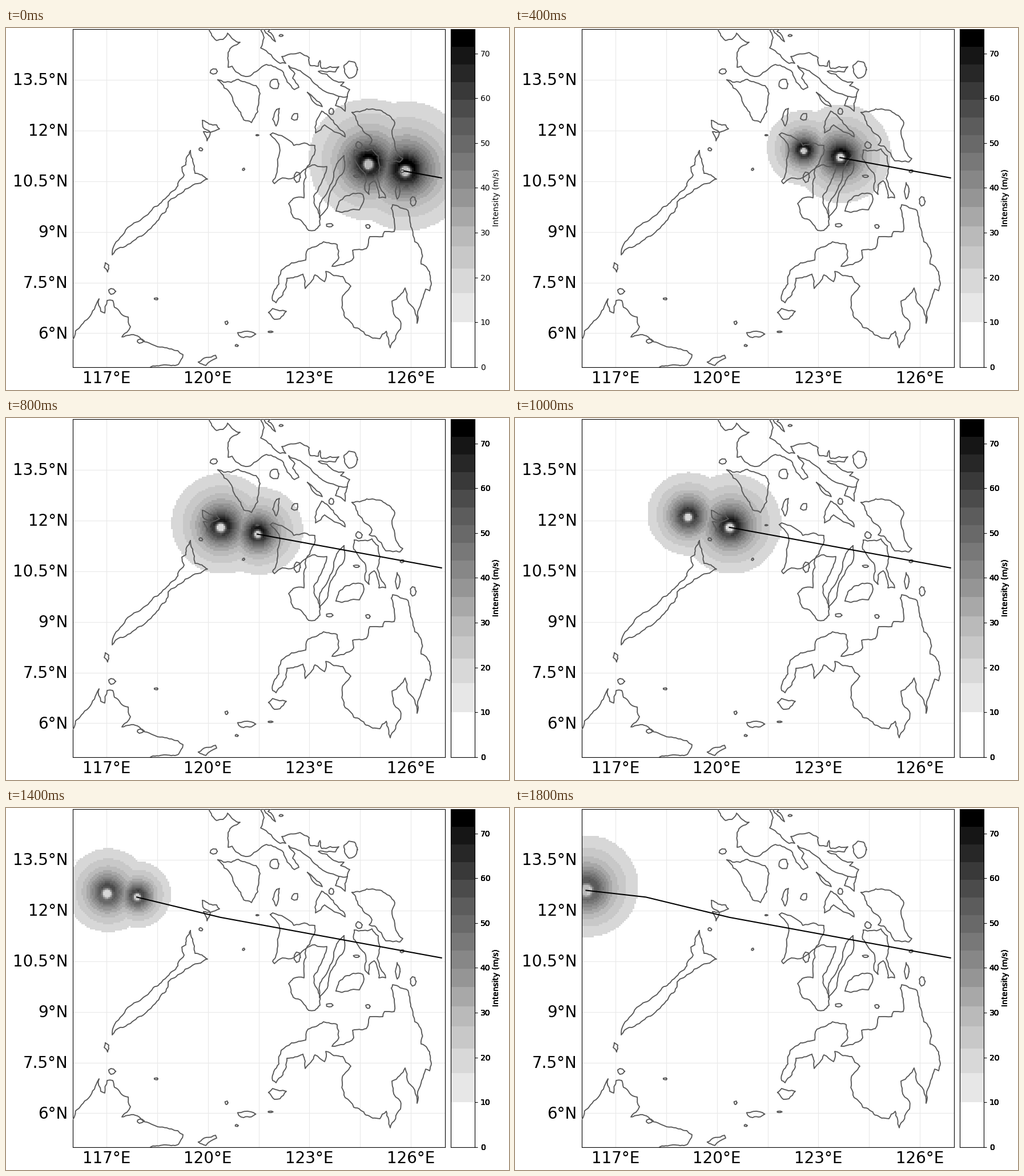
These frames come from a looping animation (881 px wide and 635 px high, 2000 ms). A matplotlib script:

```python
import numpy as np
import matplotlib.pyplot as plt
from matplotlib.animation import FuncAnimation
from matplotlib.colors import BoundaryNorm, ListedColormap

W, H = 881, 635
LEFT, RIGHT, TOP, BOTTOM = 116.5, 768.6, 2.3, 594.6
STEPS = 10
INK = "#585858"
rng = np.random.default_rng(4)

plt.rcParams["font.family"] = "DejaVu Sans"
fig = plt.figure(figsize=(W / 100, H / 100), dpi=100, facecolor="white")


def panel(x0, x1):
    return fig.add_axes([x0 / W, 1 - BOTTOM / H, (x1 - x0) / W, (BOTTOM - TOP) / H])


def px(lon, lat):
    return (LEFT + (lon - 116) * (RIGHT - LEFT) / 11,
            BOTTOM - (lat - 5) * (BOTTOM - TOP) / 10)


def label(x, y, s, **kw):
    return fig.text(x / W, 1 - y / H, s, **kw)


# Map axes use stage pixels as data units.
ax = panel(LEFT, RIGHT)
ax.set(xlim=(LEFT, RIGHT), ylim=(BOTTOM, TOP), xticks=[], yticks=[])

for lon in np.arange(117, 127, 1.5):
    x = px(lon, 5)[0]
    ax.axvline(x, color="#e9e9e9", lw=0.8, zorder=0.5)
    if lon % 3 == 0:
        label(x, 623.3, f"{lon:.0f}°E", size=20, ha="center", va="baseline")
for lat in np.arange(6, 14, 1.5):
    y = px(116, lat)[1]
    ax.axhline(y, color="#e9e9e9", lw=0.8, zorder=0.5)
    label(108.5, y - 1.7, f"{lat:g}°N", size=20, ha="right", va="center_baseline")


# ---- coastlines: key points joined by fractal lines ----
def fractal(a, b):
    """Points from a up to b, split until short, each midpoint pushed sideways."""
    d = b - a
    if np.hypot(*d) < 6:
        return [a]
    mid = (a + b) / 2 + np.array([-d[1], d[0]]) * rng.uniform(-0.12, 0.12)
    return fractal(a, mid) + fractal(mid, b)


def shore(*xy):
    keys = np.array(xy, float).reshape(-1, 2)
    points = [p for a, b in zip(keys[:-1], keys[1:]) for p in fractal(a, b)]
    ax.plot(*np.array(points + [keys[-1]]).T, color=INK, lw=1.35, zorder=3)


def land(*xy):
    shore(*xy, *xy[:2])


def islet(x, y, w, h):
    t = np.linspace(0, 2 * np.pi, 8)[:-1]
    r = rng.uniform(0.7, 1.1, 7) / 2
    land(*np.column_stack([x + w * r * np.cos(t), y + h * r * np.sin(t)]).ravel())


# Luzon
shore(356, 2, 369, 22, 380, 20, 388, 9, 398, 20, 410, 25, 389, 43, 389, 69, 396, 67,
      412, 83, 428, 84, 456, 64, 486, 78, 505, 108, 513, 104, 502, 88, 506, 80, 495, 66,
      521, 80, 536, 93, 562, 113, 583, 120, 577, 136, 594, 146, 598, 120, 583, 120)
shore(446, 2, 452, 17, 446, 35, 480, 62, 490, 62, 483, 50, 515, 43, 531, 52, 533, 66,
      547, 67, 550, 57, 553, 71, 583, 68, 577, 77, 547, 76, 574, 92, 592, 95, 586, 101,
      602, 108, 598, 120)
shore(452, 2, 460, 13, 472, 24, 459, 6, 463, 2)
# Mindoro
land(371, 91, 381, 95, 407, 90, 422, 96, 438, 101, 445, 115, 441, 147, 430, 166,
     416, 161, 402, 137, 395, 118)
# Tablas, Busuanga, Culion, Balabac
land(474, 143, 479, 141, 473, 172, 467, 160)
land(344, 162, 369, 170, 374, 177, 358, 183, 345, 174)
land(346, 182, 358, 183, 352, 198)
land(174, 412, 180, 416, 178, 428, 172, 420)
# Palawan
land(323, 215, 327, 230, 331, 255, 353, 265, 341, 272, 307, 290, 284, 305, 280, 322,
     244, 360, 218, 378, 186, 398, 190, 380, 218, 347, 244, 330, 258, 315, 297, 283,
     312, 258, 308, 244, 315, 240)
# Borneo, Basilan, Tawi-Tawi
shore(117, 546, 132, 521, 155, 493, 163, 475, 166, 497, 173, 500, 177, 478, 187, 478,
      190, 490, 214, 507, 218, 524, 203, 542, 230, 540, 258, 556, 290, 563, 310, 573,
      302, 590, 252, 596)
land(460, 499, 467, 492, 491, 497, 480, 510, 470, 511)
land(337, 586, 367, 574, 369, 579, 350, 592)
# Panay, Negros, Cebu
land(463, 187, 467, 184, 504, 206, 541, 206, 540, 222, 518, 252, 505, 262, 484, 263,
     470, 273, 467, 269, 475, 247, 478, 204)
land(525, 247, 541, 240, 562, 243, 557, 262, 539, 295, 545, 317, 550, 346, 541, 355,
     530, 355, 503, 332, 495, 308, 503, 299, 522, 298, 522, 277)
land(592, 224, 593, 247, 578, 272, 565, 303, 549, 333, 554, 300, 574, 261, 577, 245)
# Bohol, Masbate, Burias
land(578, 321, 583, 305, 608, 290, 625, 292, 627, 300, 619, 319)
land(553, 146, 573, 162, 592, 183, 594, 191, 558, 170, 542, 184)
land(528, 113, 541, 124, 554, 138, 537, 128)
# Samar, Leyte
land(606, 148, 658, 145, 681, 166, 676, 180, 681, 203, 695, 229, 690, 235, 665, 233,
     646, 207, 636, 205, 641, 196, 617, 170)
land(610, 214, 625, 215, 641, 212, 652, 224, 650, 264, 665, 298, 653, 298, 645, 268,
     636, 275, 636, 292, 629, 285, 628, 254, 609, 230)
# Mindanao
shore(675, 316, 677, 310, 704, 320, 711, 352, 716, 375, 726, 386, 727, 414, 738, 422,
      745, 448, 742, 461, 735, 458, 728, 478, 720, 518, 716, 495, 699, 456, 676, 479,
      678, 496, 691, 515, 691, 528, 673, 561, 666, 532, 655, 545, 609, 525, 594, 508,
      589, 472, 604, 453, 590, 436, 560, 427, 558, 445, 541, 433, 524, 457, 520, 432)
shore(520, 432, 492, 439, 485, 468, 473, 482, 467, 478, 478, 449, 482, 425, 500, 412,
      525, 407, 529, 388, 556, 375, 580, 380, 583, 403, 571, 418, 609, 403, 607, 390,
      631, 387, 637, 366, 660, 366, 663, 357, 680, 357, 680, 335, 675, 316)

for spot in [(603, 73, 23, 31), (470, 98, 18, 21), (364, 76, 13, 10), (506, 156, 14, 14),
             (618, 205, 15, 12), (686, 287, 8, 30), (713, 304, 11, 18), (567, 346, 12, 8),
             (634, 348, 9, 9), (510, 262, 12, 18), (570, 147, 10, 13), (614, 260, 12, 5),
             (420, 537, 32, 12), (235, 549, 13, 8), (185, 462, 13, 12), (341, 213, 7, 6),
             (263, 475, 7, 4), (386, 517, 5, 7), (404, 557, 5, 4), (694, 251, 8, 6),
             (482, 13, 8, 4), (440, 188, 6, 3), (416, 248, 4, 5), (463, 533, 8, 3)]:
    islet(*spot)

# ---- intensity scale: bands narrow towards a constant width ----
levels = np.r_[0, 10, 10 + np.cumsum(3.92 + 2.6 * np.exp(-np.arange(15) / 2))]
mids = (levels[1:] + levels[:-1]) / 2
shades = plt.get_cmap("Greys")(mids / levels[-1])
shades[0, :3], shades[-1, :3] = 1, 0
cmap = ListedColormap(shades)
norm = BoundaryNorm(levels, len(mids), clip=True)

bar = panel(779, 820.7)
bar.pcolormesh([0, 1], levels, mids[:, None], cmap=cmap, norm=norm)
bar.set(xticks=[], yticks=range(0, 71, 10), ylim=(0, levels[-1]))
bar.yaxis.tick_right()
bar.tick_params(labelright=False)


def bar_text():
    """One layer of scale lettering."""
    ticks = [label(830.7, BOTTOM - 0.5 - v * (BOTTOM - TOP) / levels[-1], str(v), size=10,
                   ha="left", va="center_baseline") for v in range(0, 71, 10)]
    return ticks + [label(852.5, 298, "Intensity (m/s)", size=10, rotation=90,
                          ha="left", va="center")]


# The lettering is overprinted again on each step, so it gets heavier.
layers = [bar_text() for _ in range(6)]

# ---- storm: position, size and strength eased between a few fixes ----
k = np.arange(STEPS + 2)
track = np.column_stack(px(np.interp(k, [0, 6, 8, 11], [126.9, 120.37, 117.9, 115.25]),
                           np.interp(k, [0, 6, 8, 11], [10.6, 11.8, 12.4, 12.7])))
reach = np.interp(k, [1, 2, 4, 6, 8, 10], [113, 107, 66, 88, 58, 89])
peak = np.interp(k, [1, 6, 8, 10], [70, 64, 56, 52])
GALE, SHAPE = 17.5, 1.9

cells_x = LEFT + (np.arange(220) + 0.5) * (RIGHT - LEFT) / 220
cells_y = TOP + (np.arange(200) + 0.5) * (BOTTOM - TOP) / 200
gx, gy = np.meshgrid(cells_x, cells_y)


def wind(n):
    """Holland profile that drops to gale force at the reach, stronger to the north."""
    dx, dy = gx - track[n, 0], gy - track[n, 1]
    r = np.maximum(np.hypot(dx, dy), 1)
    u = (GALE / peak[n]) ** 2 / np.e
    core = reach[n] * (u * (1 + u)) ** (1 / SHAPE)
    x = (core / r) ** SHAPE
    v = peak[n] * np.sqrt(x * np.exp(1 - x)) * (1 + 0.07 * (0.3 * dx - dy) / r)
    return np.where(r < core, np.maximum(v, 18), v)


def field(i):
    v = np.maximum(wind(i + 1), wind(min(i + 2, STEPS + 1)))
    return np.ma.masked_less(v, GALE)


image = ax.imshow(field(0), cmap=cmap, norm=norm, interpolation="nearest", aspect="auto",
                  extent=(LEFT, RIGHT, BOTTOM, TOP), zorder=1)
path, = ax.plot([], [], color="black", lw=1.5, zorder=4)
ax.set(xlim=(LEFT, RIGHT), ylim=(BOTTOM, TOP))


def draw(i):
    image.set_data(field(i))
    path.set_data(*track[:i + 2].T)
    for n, layer in enumerate(layers):
        for t in layer:
            t.set_visible(n <= i)
    return [image, path]


anim = FuncAnimation(fig, draw, frames=STEPS, interval=200, repeat=True, repeat_delay=0)
plt.show()
```
